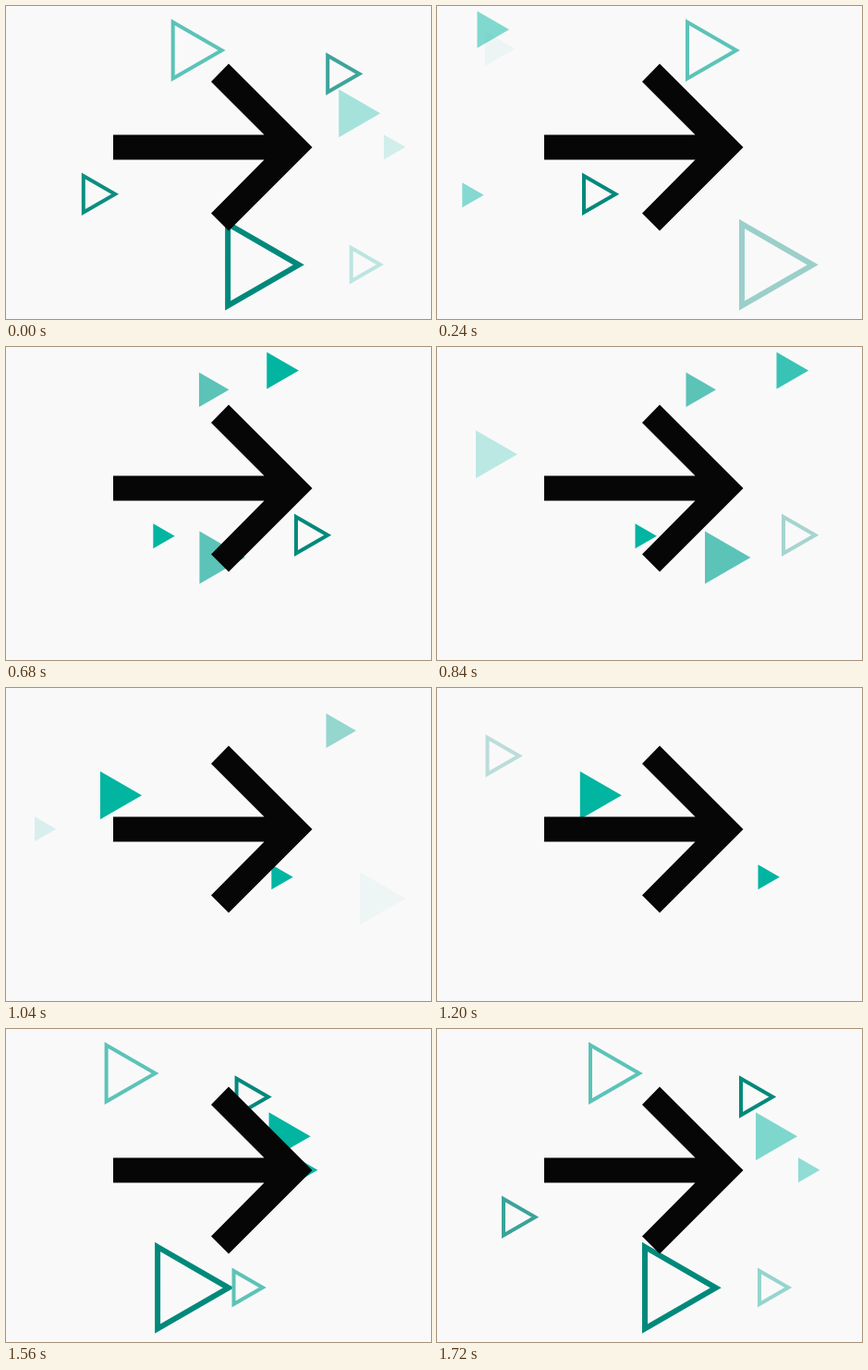
Animation, 460 px wide and 339 px high, one loop 1760 ms. Source, as an HTML page:

```html
<!DOCTYPE html>
<html lang="en">
<head>
<meta charset="utf-8">
<title>Arrow</title>
<style>
  html, body { margin: 0; width: 100%; height: 100%; overflow: hidden; background: #f9f9f9; }
  svg { display: block; width: 460px; height: 339px; }
</style>
</head>
<body>
<svg viewBox="0 0 460 339">
  <g id="triangles"></g>
  <path fill="#060606" d="M116 139.5H279.5L222 82L241 62.5L331.5 153L241 243.5L222 224.5L279.5 166.5H116Z"/>
</svg>
<script>
const LOOP = 1760, STEP = 40;
const DARK = '#00897b', BRIGHT = '#02b5a1', SOFT = '#5cc3b8';

// y: centre, size: side length, line: stroke width (0 = filled),
// life: [start, end] in ms, path: [time, left edge] pairs
const triangles = [
  { y: 48, size: 68, line: 4, color: SOFT, life: [1300, 2260], fade: 200,
    path: [[1360, 39], [1720, 164], [2000, 269], [2240, 361]] },
  { y: 73.5, size: 46.5, line: 4, color: DARK, life: [1160, 1880], fade: 160,
    path: [[1360, 142], [1720, 327], [1880, 402]] },
  { y: 116.2, size: 52, line: 0, color: BRIGHT, life: [780, 1840], fade: 240,
    path: [[840, 42], [1040, 102], [1360, 211], [1720, 345]] },
  { y: 152.8, size: 27, line: 0, color: BRIGHT, life: [1020, 1785], fade: 155,
    path: [[1040, 31], [1360, 209], [1720, 391], [1760, 409]] },
  { y: 203.7, size: 46.5, line: 4, color: DARK, life: [1560, 2670], fade: 210,
    path: [[1720, 70], [2000, 157], [2240, 239], [2600, 373]] },
  { y: 280.3, size: 99, line: 6, color: DARK, life: [1200, 2078], fade: 205,
    path: [[1360, 84], [1720, 222], [2000, 327]] },
  { y: 280, size: 43, line: 4, color: SOFT, life: [1205, 1822], fade: 160,
    path: [[1360, 108], [1720, 347], [1800, 396]] },
  { y: 46.2, size: 37.5, line: 0, color: SOFT, life: [222, 1175], fade: 215,
    path: [[240, 52], [480, 135.5], [840, 269.5], [1040, 346.5]] },
  { y: 25.6, size: 40, line: 0, color: BRIGHT, life: [165, 960], fade: 155,
    path: [[240, 43.5], [480, 174.5], [840, 367.5]] },
  { y: 204.8, size: 27, line: 0, color: BRIGHT, life: [165, 1392], fade: 160,
    path: [[240, 27.3], [480, 95.3], [840, 214.5], [1040, 287.3], [1360, 408.3]] },
  { y: 228, size: 57, line: 0, color: SOFT, life: [350, 1052], fade: 160,
    path: [[480, 101], [840, 290], [1040, 383]] }
];

const group = document.getElementById('triangles');

function build({ y, size, line, color }) {
  const side = size - Math.sqrt(3) * line;
  const left = line / 2;
  const right = left + side * Math.sqrt(3) / 2;
  const el = document.createElementNS('http://www.w3.org/2000/svg', 'path');
  el.setAttribute('d', `M${left} ${y - side / 2}L${right} ${y}L${left} ${y + side / 2}Z`);
  el.setAttribute('fill', line ? 'none' : color);
  if (line) {
    el.setAttribute('stroke', color);
    el.setAttribute('stroke-width', line);
  }
  return group.appendChild(el);
}

// Smooth polynomial through the given points
function along(path, t) {
  return path.reduce((sum, [ti, x], i) =>
    sum + path.reduce((w, [tj], j) => i === j ? w : w * (t - tj) / (ti - tj), x), 0);
}

for (const tri of triangles) tri.el = build(tri);

function draw() {
  const now = Math.floor(performance.now() % LOOP / STEP) * STEP;
  for (const { el, life: [start, end], fade, path } of triangles) {
    const t = now < start ? now + LOOP : now;
    const opacity = Math.max(0, Math.min(1, (t - start) / fade, (end - t) / fade));
    el.setAttribute('opacity', opacity);
    if (opacity) el.setAttribute('transform', `translate(${along(path, t)} 0)`);
  }
  requestAnimationFrame(draw);
}
draw();
</script>
</body>
</html>
```
